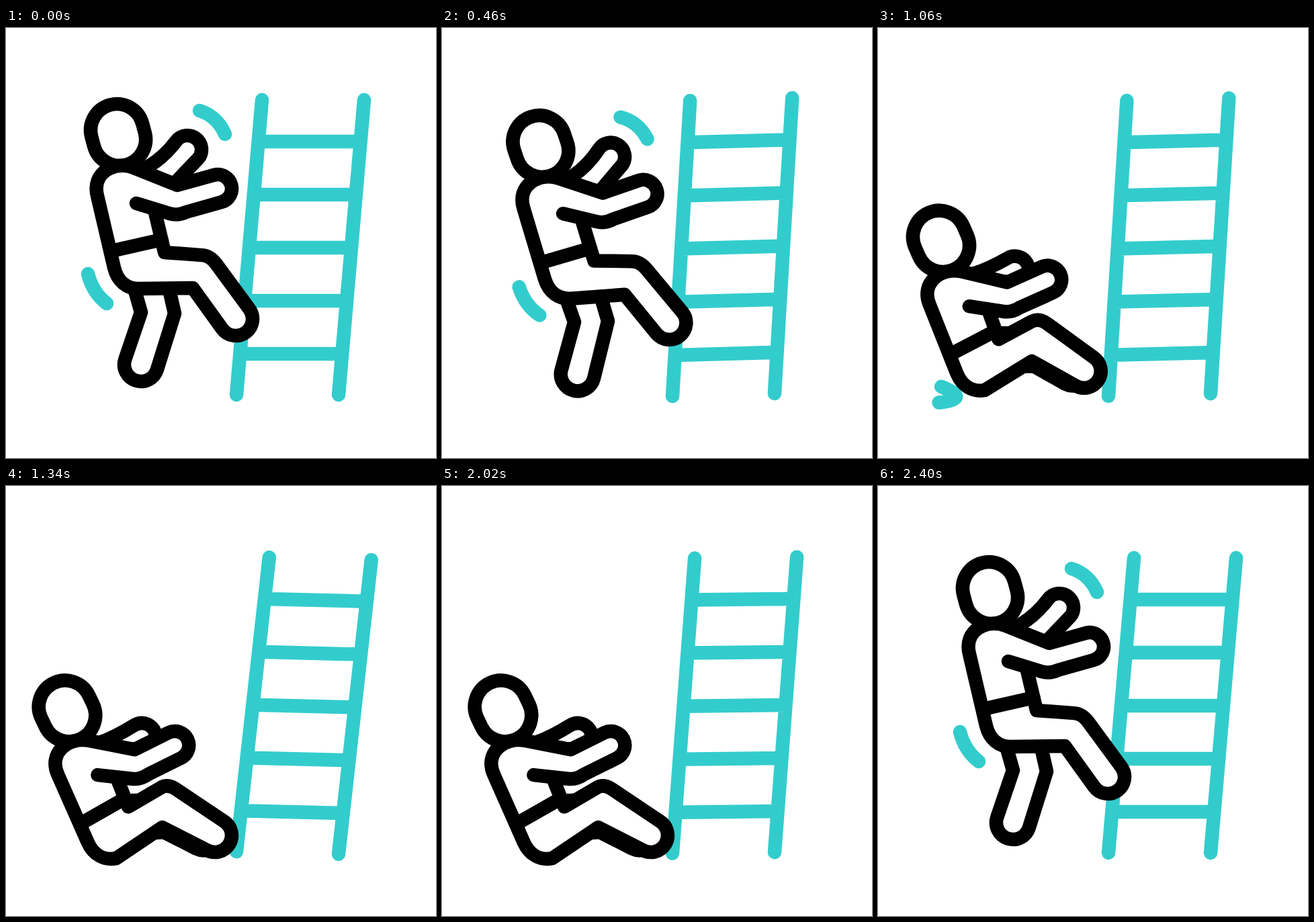
Write an HTML page that moves like this. It is 640 px wide and 640 px high and loops after 2.62 s.

```html
<!DOCTYPE html>
<html lang="en">
<head>
<meta charset="utf-8">
<title>Fall from a ladder</title>
<style>
  html, body { margin: 0; width: 100%; height: 100%; overflow: hidden; background: #fff; }
  svg { display: block; width: 100vw; height: 100vh; }
  path, rect { fill: none; stroke: #000; stroke-width: 20.5; stroke-linecap: round; stroke-linejoin: round; }
  .teal { stroke: #33cccc; }
  .solid { fill: #fff; }
</style>
</head>
<body>
<svg viewBox="0 0 640 640">
  <path id="ladder" class="teal"/>
  <g id="man">
    <path id="topArc" class="teal"/>
    <path id="lowArc" class="teal"/>
    <path id="backLeg" class="solid"/>
    <path id="backArm" class="solid"/>
    <rect class="solid" x="-39.2" y="-46.2" width="78.4" height="92.4" rx="39.2" transform="translate(167 159) rotate(-15)"/>
    <path id="body" class="solid"/>
    <path id="belt"/>
  </g>
</svg>
<script>
const LOOP = 2620, RAD = Math.PI / 180;
const $ = id => document.getElementById(id);

// joints in the body's own frame: standing, sitting
const joints = {
  crotch: [[236, 334], [230, 316]],
  kneeTop: [[304, 339], [294, 293]],
  kneeUnder: [[278, 387], [274, 355.5]],
  foot: [[342, 433], [349, 382]],
  backHip: [[217, 388], [230, 332]],
  backKnee: [[226, 424], [285, 340]],
  shin: [[81, 108], [60, 37]],
  hand: [[270, 181], [269, 218]],
  reach: [[30, 127], [34, 159]],
  shoulder: [[212, 206], [207, 214]],
  waist: [[161, 331], [160, 326]],
  topArc: [[288, 123, 314, 131, 326, 158], [255, 250, 255, 250, 255, 250]],
  lowArc: [[122, 366, 129, 394, 150, 410], [135, 373, 178, 398, 128, 396]]
};

// time, then x, y and tilt of the waist
const fall = track([
  [0, 161, 331, 0], [460, 151.5, 348, 3.5], [780, 127, 391, 10.4], [1060, 113.5, 488, 8.5],
  [1130, 116, 507, 11.8], [1240, 117, 505, 10.7], [2110, 117, 505, 10.7], [2400, 161, 331, 0]
]);
// time, ladder angle at each swing's turning point
const sway = track([
  [0, 0], [220, 2], [470, -1.55], [785, .95], [1052, -1.4], [1320, 1.5],
  [1490, -.8], [1690, 2], [1925, -1.5], [2165, .95], [2400, 0]
]);

// smooth curve through keys, flat at turning points
function track(keys) {
  const last = keys.length - 1;
  const slope = (i, j) => {
    if (i === 0 || i === last) return 0;
    const a = keys[i - 1], b = keys[i], c = keys[i + 1];
    return (b[j] - a[j]) * (c[j] - b[j]) > 0 ? (c[j] - a[j]) / (c[0] - a[0]) : 0;
  };
  return t => {
    const i = keys.findIndex(k => k[0] > t) - 1;
    if (i < 0) return keys[last].slice(1);
    const a = keys[i], b = keys[i + 1], d = b[0] - a[0], u = (t - a[0]) / d;
    return a.map((v, j) => v + (b[j] - v) * ease(u)
      + d * u * (1 - u) * ((1 - u) * slope(i, j) - u * slope(i + 1, j))).slice(1);
  };
}

const ease = u => u * u * (3 - 2 * u);
const ramp = (t, from, to) => ease(Math.min(1, Math.max(0, (t - from) / (to - from))));
const mix = (a, b, k) => a.map((v, i) => v + (b[i] - v) * k);

const polar = (c, deg, r) => [c[0] + r * Math.cos(deg * RAD), c[1] + r * Math.sin(deg * RAD)];
const angle = (a, b) => Math.atan2(b[1] - a[1], b[0] - a[0]) / RAD;
const toward = (a, b, d) => polar(a, angle(a, b), d);

const path = (...parts) => parts.map(p => Array.isArray(p) ? p.map(v => v.toFixed(2)).join(' ') : p).join(' ');
const set = (id, ...parts) => $(id).setAttribute('d', path(...parts));
// round limb end pointing along deg
const cap = (c, deg, r) => path(polar(c, deg + 90, r), 'A', [r, r], '0 0 0', polar(c, deg - 90, r));

function buildLadder() {
  let d = 'M381 107L343 546M533 107L495 546';
  for (let i = 0; i < 5; i++) {
    const y = 169 + 79 * i, x = 381 - 38 * (y - 107) / 439;
    d += `M${x} ${y}h152`;
  }
  set('ladder', d);
}

function draw(t) {
  const [x, y, tilt] = fall(t);
  const fold = ramp(t, 790, 1050) - ramp(t, 2110, 2400);
  const hide = ramp(t, 1060, 1110) - ramp(t, 2110, 2160);
  const j = {};
  for (const name in joints) j[name] = mix(...joints[name], fold);

  $('ladder').setAttribute('transform', `rotate(${sway(t)[0]} 419 546)`);
  $('man').setAttribute('transform', `translate(${x} ${y}) rotate(${-tilt}) translate(-161 -331)`);

  for (const name of ['topArc', 'lowArc']) {
    const a = mix(j[name], [190, 350, 190, 350, 190, 350], hide);
    set(name, 'M', a.slice(0, 2), 'Q', a.slice(2));
  }

  const { backHip: hip, backKnee: knee, hand } = j;
  const [length, shin] = j.shin;
  const thigh = angle(hip, knee), bend = (thigh + shin) / 2;
  set('backLeg', 'M', polar(hip, thigh + 90, 25), 'L', polar(knee, bend + 90, 25),
    'L', cap(polar(knee, shin, length), shin, 25),
    'L', polar(knee, bend - 90, 25), 'L', polar(hip, thigh - 90, 25));

  const [curve, back] = j.reach;
  set('backArm', 'M', [250, 232], 'L', cap(hand, back - 180, 21),
    'Q', polar(polar(hand, back + 90, 21), back, curve), j.shoulder);

  const { crotch, kneeTop, kneeUnder, foot } = j;
  const leg = angle(mix(kneeTop, kneeUnder, .5), foot), side = [222, 275];
  set('body', 'M194 261L243 276Q255 280 268 274L', cap([315, 239], -15.5, 21),
    'L255 234L190 208C162 197 127 215 136 250L161 357C166 377 180 388 198 388L', kneeUnder,
    'L', cap(foot, leg, 25), 'L', toward(kneeTop, polar(foot, leg - 90, 25), 15),
    'Q', kneeTop, toward(kneeTop, crotch, 12), 'L', crotch, 'L', side);
  set('belt', 'M', j.waist, 'L', mix(side, crotch, .68));
}

function tick() {
  draw(performance.now() % LOOP);
  requestAnimationFrame(tick);
}
buildLadder();
tick();
</script>
</body>
</html>
```
